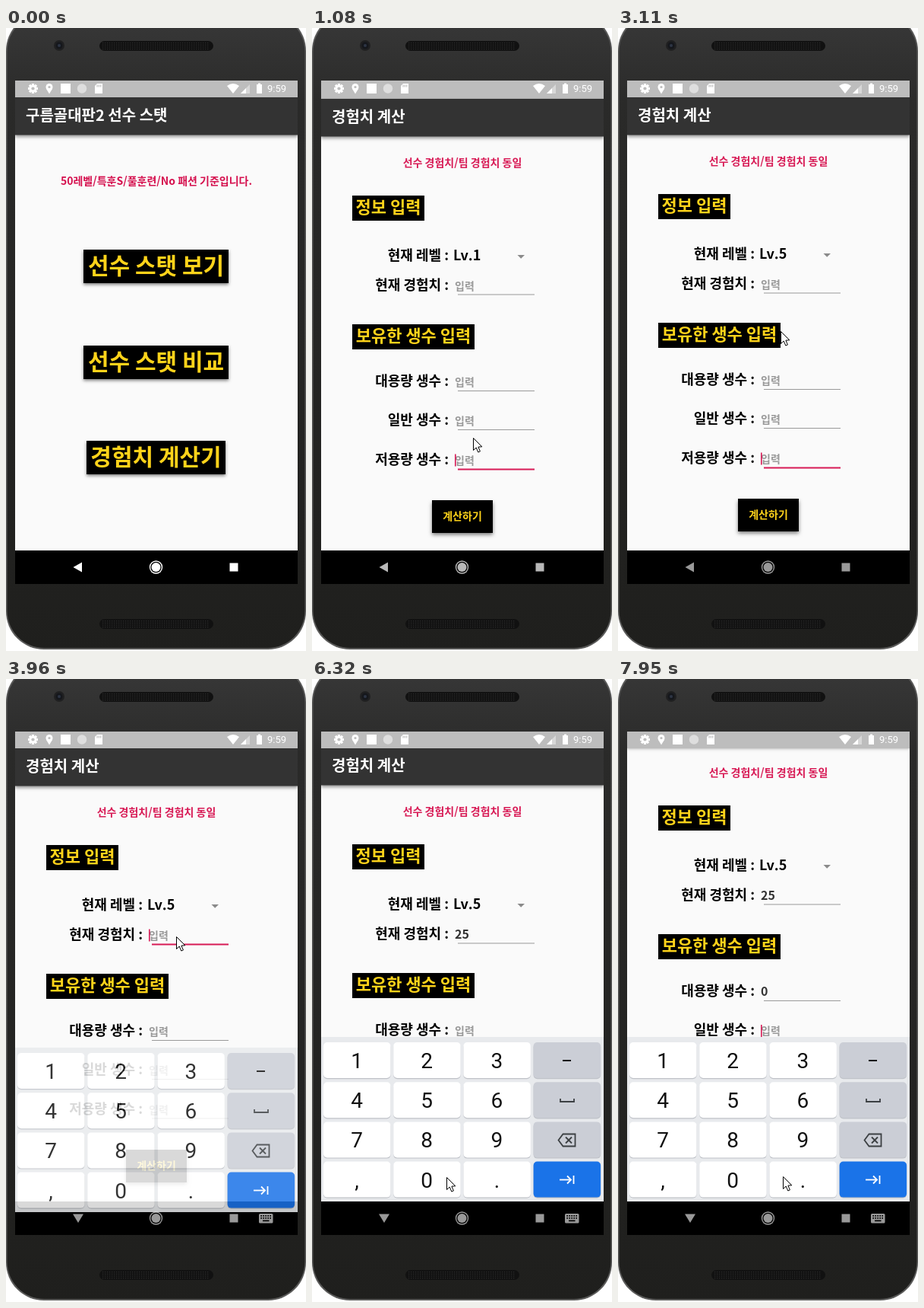
Recreate the animation shown at these times as an HTML page with a canvas. Size 395 by 818 pixels, loop 8000 ms.

```html
<!DOCTYPE html>
<html lang="ko">
<head>
<meta charset="utf-8">
<title>경험치 계산</title>
<style>
html, body { margin: 0; width: 100%; height: 100%; overflow: hidden; background: #fff; }
canvas { display: block; width: 395px; height: 818px; }
</style>
</head>
<body>
<canvas id="stage"></canvas>
<script>
const W = 395, H = 818, LOOP = 8000;
const KR = '"Noto Sans CJK KR", "Noto Sans CJK", "Noto Sans CJK JP", sans-serif';
const LATIN = 'Roboto, sans-serif';
const YELLOW = '#ffd31a', PINK = '#d81b56', PAPER = '#fafafa', STATUS = '#bdbdbd';

// Moments of the story, in ms
const T = {
  open: 900, popup: 2000, pick: 2790, tapExp: 3810, keys: 3885, type2: 4280, type5: 4830,
  next1: 5690, type0: 6690, next2: 7460
};

// Pointer stops: [time, x, y]
const STOPS = [
  [150, 250, 806], [540, 213, 558], [1000, 212, 558], [1080, 212, 538], [1620, 238, 294],
  [1700, 227, 290], [1850, 251, 294], [2080, 238, 302], [2400, 226, 430], [2620, 210, 419],
  [2950, 210, 419], [3560, 224, 338], [4680, 224, 338], [5130, 347, 676], [5450, 345, 664],
  [5850, 345, 664], [6390, 152, 653], [6690, 152, 657], [7160, 290, 636], [7310, 326, 648],
  [7480, 326, 650], [7950, 217, 653]
];

const ratio = window.devicePixelRatio || 1;
const stage = prepare(document.getElementById('stage'));
const layer = prepare(document.createElement('canvas'));
let c = stage;

function prepare(canvas) {
  canvas.width = W * ratio;
  canvas.height = H * ratio;
  const context = canvas.getContext('2d');
  context.scale(ratio, ratio);
  return context;
}

const span = (t, a, b) => Math.max(0, Math.min(1, (t - a) / (b - a)));
const lerp = (a, b, k) => a + (b - a) * k;
const easeOut = (k, power) => 1 - Math.pow(1 - k, power);

function rect(x, y, w, h, color) {
  c.fillStyle = color;
  c.fillRect(x, y, w, h);
}

function round(x, y, w, h, r, color) {
  c.fillStyle = color;
  c.beginPath();
  c.roundRect(x, y, w, h, r);
  c.fill();
}

function disc(x, y, r, color) {
  c.fillStyle = color;
  c.beginPath();
  c.arc(x, y, r, 0, Math.PI * 2);
  c.fill();
}

function trace(points, closed) {
  c.beginPath();
  for (const [x, y] of points) c.lineTo(x, y);
  if (closed) c.closePath();
}

function poly(points, color) {
  trace(points, true);
  c.fillStyle = color;
  c.fill();
}

function line(points, color, width = 1.8, closed = false) {
  trace(points, closed);
  c.strokeStyle = color;
  c.lineWidth = width;
  c.stroke();
}

function text(s, x, mid, size, color = '#000', align = 'left', font = '900 ' + size + 'px ' + KR) {
  c.font = font;
  c.textAlign = align;
  c.fillStyle = color;
  c.fillText(s, x, mid + size * 0.36);
}

function scoped(draw) {
  c.save();
  draw();
  c.restore();
}

function raised(blur, dy, alpha, draw) {
  scoped(() => {
    c.shadowColor = `rgba(0,0,0,${alpha})`;
    c.shadowBlur = blur * ratio;
    c.shadowOffsetY = dy * ratio;
    draw();
  });
}

function clip(x, y, w, h, draw) {
  scoped(() => {
    c.beginPath();
    c.rect(x, y, w, h);
    c.clip();
    draw();
  });
}

function speaker(y) {
  round(123, y, 150, 13, 6.5, '#111');
  for (let j = 0; j < 4; j++)
    for (let i = 0; i < 47; i++) rect(127 + i * 3, y + 2 + j * 2.7, 1.3, 1.2, '#2c2c2c');
}

function phone() {
  rect(0, 0, W, H, '#fff');
  const body = c.createLinearGradient(0, 0, 0, H);
  body.addColorStop(0, '#363636');
  body.addColorStop(0.12, '#2a2a29');
  body.addColorStop(1, '#1f1f1d');
  round(0, -20, 395, 836, 50, '#5a5a59');
  round(1.5, -18, 392, 832, 49, body);
  speaker(17);
  speaker(776);
  disc(70, 23, 7, '#202021');
  disc(70, 23, 4.5, '#15171c');
  disc(70, 23, 2, '#2d3544');
}

function gear(x, y) {
  for (let i = 0; i < 8; i++) scoped(() => {
    c.translate(x, y);
    c.rotate(i * Math.PI / 4);
    rect(-1.6, -6.5, 3.2, 4, '#fff');
  });
  disc(x, y, 4.8, '#fff');
  disc(x, y, 2.1, STATUS);
}

function statusBar() {
  rect(12, 69, 372, 22, STATUS);
  gear(35.5, 79.5);
  poly([[52.8, 79.5], [61.2, 79.5], [57, 86.5]], '#fff');
  disc(57, 77.5, 4.5, '#fff');
  disc(57, 77.5, 1.6, STATUS);
  rect(72, 73, 13, 13, '#fff');
  disc(100, 79.5, 6.2, '#dedede');
  poly([[120, 73], [127, 73], [127, 86], [117, 86], [117, 76]], '#fff');
  for (let i = 0; i < 3; i++) rect(119.5 + i * 2.3, 74.5, 1.2, 3, STATUS);
  c.fillStyle = '#fff';
  c.beginPath();
  c.moveTo(299, 86);
  c.lineTo(291, 76);
  c.quadraticCurveTo(299, 70, 307, 76);
  c.fill();
  poly([[309, 86], [321, 74], [321, 86]], '#d8d8d8');
  poly([[309, 86], [316, 79], [316, 86]], '#fff');
  rect(330, 74, 7, 12, '#fff');
  rect(332, 72.5, 3, 2, '#fff');
  text('9:59', 344, 79.5, 13, '#fff', 'left', '400 13px ' + LATIN);
}

function appBar(title) {
  raised(4, 2, 0.4, () => rect(12, 91, 372, 49.5, '#333'));
  text(title, 26, 114.5, 20, '#fff');
}

function badge(s, x, y, w, h, size, blur = 0) {
  raised(blur, Math.min(5, blur / 2), 0.5, () => rect(x, y, w, h, '#000'));
  text(s, x + w / 2, y + h / 2 - 1, size, YELLOW, 'center');
}

function homePage(t) {
  rect(12, 69, 372, 617, PAPER);
  appBar('구름골대판2 선수 스탯');
  text('50레벨/특훈S/풀훈련/No 패션 기준입니다.', 198, 200.5, 14, '#d5104e', 'center');
  badge('선수 스탯 보기', 102, 291, 191, 44, 30, 4);
  badge('선수 스탯 비교', 102, 417, 191, 44, 30, 4);
  badge('경험치 계산기', 106, 542, 183, 44, 30, 4 + 10 * span(t, 540, 700));
}

function field(label, mid, value, focused, caret) {
  text(label + ' :', 180, mid, 18, '#000', 'right');
  if (value) text(value, 188, mid + 0.5, 16, '#333');
  else text('입력', 188, mid + 1, 14, '#999');
  rect(192, mid + 12, 101, focused ? 2 : 1, focused ? PINK : '#9a9a9a');
  if (!focused || !caret) return;
  c.font = '900 16px ' + KR;
  rect(188 + (value && c.measureText(value).width + 1), mid - 7, 1.6, 16, PINK);
}

function formPage(t) {
  const after = name => t >= T[name];
  const focus = after('next2') ? 2 : after('next1') ? 1 : after('tapExp') ? 0 : 3;
  const exp = after('type5') ? '25' : after('type2') ? '2' : '';
  const blinkFrom = Math.max(...Object.keys(T)
    .filter(name => after(name) && !['popup', 'pick', 'keys'].includes(name))
    .map(name => T[name]));
  const caret = (t - blinkFrom) % 1000 < 500;

  rect(12, 69, 372, 680, PAPER);
  rect(12, 60, 372, 31, STATUS);
  appBar('경험치 계산');
  text('선수 경험치/팀 경험치 동일', 198, 174.5, 14, PINK, 'center');
  badge('정보 입력', 53, 218, 95, 33, 22);
  text('현재 레벨 :', 180, 296.5, 18, '#000', 'right');
  text(t < T.pick + 70 ? 'Lv.1' : 'Lv.5', 186, 297, 18);
  poly([[270.5, 296], [280, 296], [275.2, 300.8]], '#8a8a8a');
  field('현재 경험치', 335.5, exp, focus === 0, caret);
  badge('보유한 생수 입력', 53, 387, 161, 33, 22);
  field('대용량 생수', 462, after('type0') ? '0' : '', focus === 1, caret);
  field('일반 생수', 513, '', focus === 2, caret);
  field('저용량 생수', 564.5, '', focus === 3, caret);
  badge('계산하기', 158, 618, 80, 43, 14, 5);
}

function form(t) {
  if (t < T.open) return;
  const slide = 53 * Math.pow(1 - span(t, T.open, T.open + 360), 5);
  const pan = t < T.next1 ? 0 : lerp(-1, -52, easeOut(span(t, T.next2, T.next2 + 340), 3));
  scoped(() => {
    c.globalAlpha = easeOut(span(t, T.open, T.open + 180), 4);
    c.translate(0, Math.round(slide + pan));
    formPage(t);
  });
}

function popup(t) {
  const alpha = span(t, T.popup - 40, T.popup + 70) - span(t, T.pick, T.pick + 160);
  if (t < T.popup || alpha <= 0) return;
  scoped(() => {
    c.globalAlpha = alpha;
    raised(14, 5, 0.38, () => rect(179, 235, 118, 439, PAPER));
    if (t >= T.pick) rect(179, 400, 118, 43.4, '#dedede');
    for (let i = 0; i < 10; i++) text('Lv.' + (i + 1), 186, 248.5 + i * 43.4, 18);
    c.globalAlpha = alpha * (1 - span(t, 2240, 2400));
    rect(293, 235, 4, 87, '#b4b4b4');
  });
}

function navBar(t) {
  rect(12, 686, 372, 44, '#000');
  const g = Math.round(lerp(255, 153, span(t, 850, 1180)));
  const ink = `rgb(${g},${g},${g})`;
  const typing = t >= T.keys;
  if (typing) poly([[88, 702.5], [102, 702.5], [95, 714]], ink);
  else poly([[100, 701.5], [100, 714.5], [88.5, 708]], ink);
  disc(197.5, 708, 8.7, ink);
  disc(197.5, 708, 7.3, '#000');
  disc(197.5, 708, 6, ink);
  rect(294.5, 702.5, 11, 11, ink);
  if (!typing) return;
  round(333, 702, 18.5, 12.5, 1.5, ink);
  for (let i = 0; i < 10; i++)
    rect(335.3 + i % 5 * 3, 704 + Math.floor(i / 5) * 3, 1.7, 1.7, '#000');
  rect(338, 710.5, 8.5, 1.7, '#000');
}

function key(x, y, color, label = '') {
  round(x, y + 1.2, 88.5, 47, 5, '#bfc2c8');
  round(x, y, 88.5, 47, 5, color);
  text(label, x + 44, y + 24, 28, '#111', 'center', '400 28px ' + LATIN);
}

function keyboardFace(t) {
  const icon = '#3c4043';
  const pressed = [T.next1, T.next2].some(at => Math.abs(t - at) < 60);
  rect(12, 470, 372, 216, '#e8eaed');
  ['123', '456', '789', ',0.'].forEach((row, j) => {
    const y = 477 + j * 52.2;
    [...row].forEach((label, i) => key(15 + i * 92.2, y, '#fff', label));
    key(291.6, y, j < 3 ? '#cbced6' : pressed ? '#1763ca' : '#1a73e8');
  });
  rect(330, 500, 11, 2, '#111');
  line([[327, 551], [327, 555], [345, 555], [345, 551]], icon);
  line([[324.5, 605.5], [330.5, 597.5], [346.5, 597.5], [346.5, 613.5], [330.5, 613.5]], icon, 1.8, true);
  line([[334, 601.5], [342, 609.5]], icon);
  line([[342, 601.5], [334, 609.5]], icon);
  line([[326, 657.5], [341, 657.5]], '#fff');
  line([[336, 652.5], [341, 657.5], [336, 662.5]], '#fff');
  line([[344.5, 652], [344.5, 663]], '#fff');
}

// Painted on its own layer so that it fades in as one piece
function keyboard(t) {
  if (t < T.keys) return;
  const left = 1 - span(t, T.keys, T.keys + 225);
  c = layer;
  keyboardFace(t);
  c = stage;
  scoped(() => {
    c.globalAlpha = 1 - 0.55 * Math.pow(left, 3.2);
    c.drawImage(layer.canvas, 0, 29 * Math.pow(left, 1.8), W, H);
  });
}

function pointer(t) {
  if (t < STOPS[0][0]) return;
  const next = STOPS.findIndex(stop => stop[0] > t);
  const b = STOPS.at(next), a = next < 0 ? b : STOPS[next - 1];
  const k = a === b ? 0 : span(t, a[0], b[0]);
  const arrow = [[0, 0], [0, 16], [3.7, 12.5], [6.3, 18.5], [8.9, 17.4], [6.4, 11.6], [11.3, 11.3]];
  scoped(() => {
    c.translate(Math.round(lerp(a[1], b[1], k)) + 0.5, Math.round(lerp(a[2], b[2], k)) + 0.5);
    poly(arrow, '#fff');
    line(arrow, '#000', 1, true);
  });
}

function paint(t) {
  phone();
  clip(12, 69, 372, 661, () => {
    homePage(t);
    form(t);
    statusBar();
    popup(t);
    navBar(t);
    keyboard(t);
  });
  pointer(t);
}

let start;
function tick(now) {
  start ??= now;
  paint((now - start) % LOOP);
  requestAnimationFrame(tick);
}

paint(0);
requestAnimationFrame(tick);
</script>
</body>
</html>
```
